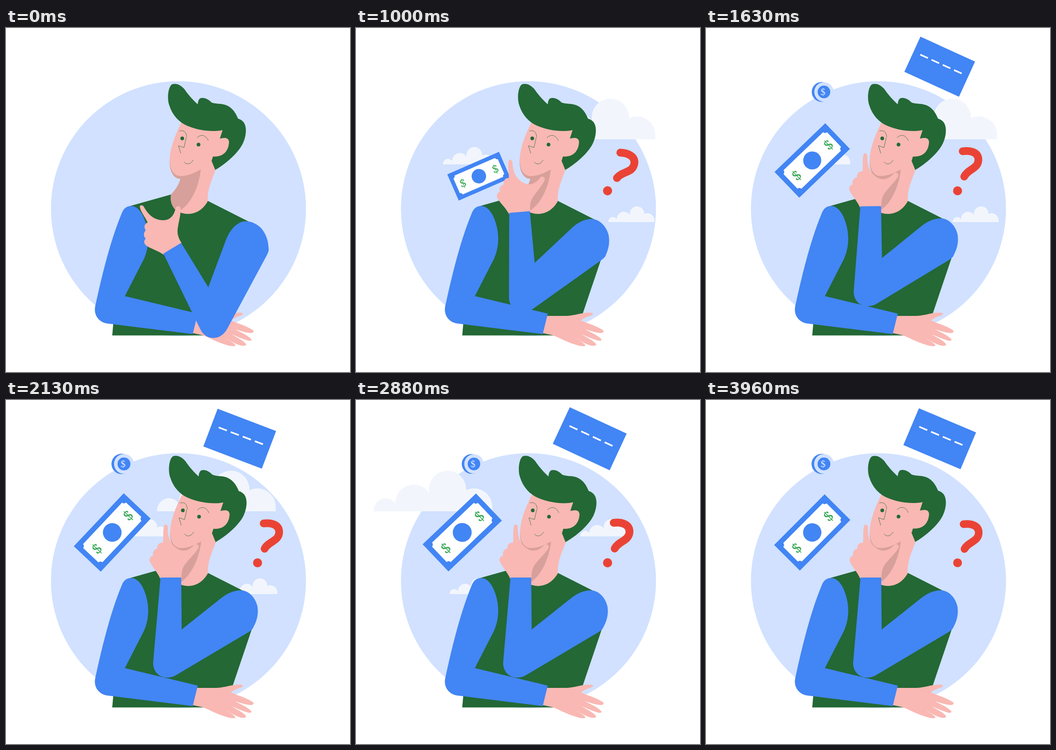
These frames come from a looping animation (748x748 px, 4000 ms). An HTML page:

```html
<!DOCTYPE html>
<html lang="en">
<head>
<meta charset="utf-8">
<title>Thinking about money</title>
<style>
  html, body { margin: 0; width: 100%; height: 100%; overflow: hidden; background: #fff; }
  svg { display: block; width: 100vw; height: 100vh; }
  text { font-family: "Liberation Serif", "Noto Serif", serif; text-anchor: middle; }
  .blue { fill: #4285f4; }
  .pale { fill: #d1e1ff; }
  .green { fill: #236835; }
  .skin { fill: #f9b8b3; }
  .shade { fill: #d8a09a; }
  .cloud { fill: #f2f6fc; }
  .line { fill: none; stroke: #236835; stroke-width: .8; }
  .cash { fill: #34a853; font: 32px "Noto Serif", "Liberation Serif", serif; }
</style>
</head>
<body>
<svg viewBox="0 0 748 748">
  <defs>
    <path id="puff" d="M0 0A26 28 0 0 1 47 -17A40 40 0 0 1 121 -39A40.5 40.5 0 1 1 201 -46A40 40 0 0 1 258 -10V0Z"/>
  </defs>
  <circle class="pale" cx="375" cy="393" r="277.3"/>

  <g class="cloud">
    <use id="cloudBig" href="#puff"/>
    <use id="cloudLeft" href="#puff"/>
    <use id="cloudLow" href="#puff"/>
  </g>

  <g id="card">
    <rect class="blue" x="-68" y="-43.8" width="136" height="87.6"/>
    <path d="M-51.5 -6.7H51.5" stroke="#fff" stroke-width="3.6" stroke-dasharray="19 9"/>
  </g>

  <g id="coin">
    <circle class="blue" cx="-3" r="21.8"/>
    <circle class="pale" cx="2" r="21.3"/>
    <circle class="blue" cx="2" r="13.8"/>
    <text y="7" font-size="21" fill="#e8f0ff">$</text>
  </g>

  <g id="bill">
    <rect class="blue" x="-78" y="-39.6" width="156" height="79.2"/>
    <rect x="-67" y="-28.5" width="134" height="57" fill="#fff"/>
    <g class="blue">
      <circle cx="-67" cy="-28.5" r="6"/><circle cx="67" cy="-28.5" r="6"/>
      <circle cx="-67" cy="28.5" r="6"/><circle cx="67" cy="28.5" r="6"/>
      <circle r="20"/>
    </g>
    <text class="cash" x="-48" y="11.500">$</text>
    <text class="cash" x="50" y="11.500">$</text>
  </g>

  <g id="question">
    <path d="M13 -84C28 -86 45 -82 46 -67C47 -46 23 -46 15 -30" fill="none" stroke="#ea4335" stroke-width="16.5" stroke-linecap="round"/>
    <circle r="9.6" fill="#ea4335"/>
  </g>

  <path class="green" d="M270 387L359 362L400 380L439 376L530 422L538 488L477 668.500H231L233.500 640L262 560Z"/>

  <g id="head">
    <path class="skin" d="M381 322C377 341 368 352 359 362C356 376 362 390 372 398C396 411 424 404 439 376C437 352 447 332 456 307L430 290Z"/>
    <path class="shade" d="M356 284C354 310 364 328 379 328C375 343 367 353 359 362C356 376 361 388 368 395Q374 397 380 396C404 380 420 343 424 305L380 300Z"/>
    <path class="skin" d="M382 204C367 234 356 264 356 286C356 306 364 322 380 322C398 322 412 313 425 307L455 308L448 284L472 284L500 240L480 200Z"/>
    <path class="green" d="M361 122.500C352 128 350 155 355 168C362 190 376 205 395 213C420 223.500 450 226.500 471 222L465 240.500C472 239 484 236 485 248C484 267 473 281 450 279.500L447 289L455 308.500C480 294 506 270 515 251C522 236 525 215 516 204C512 200 508 198 504.500 197C497 178 485 166 465 165C458 164.500 452 164 447 162C439 154 430 150 422 153C418.500 156 417.500 160 417 166C407 157 396 145 388 133C379 123 370 119.500 361 122.500Z"/>
    <g class="green"><circle cx="383.200" cy="240" r="4"/><circle cx="418.600" cy="253.500" r="4"/></g>
    <g class="line">
      <path d="M377 224C386 221 392 226 393 237"/>
      <path d="M415 239C424 230 434 232 440 245"/>
      <path d="M392 238L387 260L375 256L380 272.500"/>
      <path d="M387 291C393 298 401 297 407 287"/>
    </g>
  </g>

  <path class="skin" d="M412 626L458 626C478 625 490 618 511 619C518 620 516 624 508 626C500 629 495 631 489 636C506 643 523 648 537 657C541 661 536 664 529 663C517 662 506 657 498 655C511 662 524 667 533 676C536 681 528 681 521 678C510 675 500 669 490 666C503 673 515 679 522 687C523 692 514 692 506 689C494 685 485 678 478 674C486 680 495 684 499 690C498 694 484 691 476 688C458 683 444 674 428 668L404 663Z"/>
  <path class="blue" d="M270 387C261 388 255 394 252 402C229 457 210 530 194 605C190 624 202 640 220 642.500L406 665.500L417 621L258.500 583L300 502C311 477 312 450 304 424C298 404 287 386 270 387Z"/>

  <path id="hand" class="skin" d="M291 389C290 385 297 384 300 389C306 400 318 418 342 418C358 418 366 406 369 391C371 386 380 386 380 394C380 408 373 430 373 442C373 452 377 460 382 468L343 493C330 484 318 481 308 475C300 471 298 463 304 458C298 453 299 444 304 440C299 434 301 425 308 423C302 410 293 400 291 389Z"/>
  <path id="sleeve" class="blue" d="M336 386L320 570C319 590 333 603.500 350 603.500C358 603.500 364 601.500 371 597.500L526 505.500C533 501 536 499 538 494C546 479 549 466 547 450C543 430 528 415 513 414C495 413 480 421 465 433L382 499L381 386Z"/>
</svg>
<script>
const LOOP = 4000;
const clamp = v => Math.max(0, Math.min(1, v));
const smooth = v => v * v * (3 - 2 * v);
const mix = (a, b, p) => a + (b - a) * p;
const set = (id, transform) => document.getElementById(id).setAttribute('transform', transform);
const place = (id, x, y, angle, scale) =>
  set(id, `translate(${x} ${y}) rotate(${angle}) scale(${scale})`);

// Smooth interpolation through [time, value] pairs
function keys(t, ...list) {
  if (t <= list[0][0]) return list[0][1];
  for (let i = 1; i < list.length; i++) {
    const [t0, v0] = list[i - 1], [t1, v1] = list[i];
    if (t <= t1) return mix(v0, v1, smooth((t - t0) / (t1 - t0)));
  }
  return list[list.length - 1][1];
}

// cubic-bezier(x1, 0, x2, 1)
function ease(x, x1, x2) {
  let lo = 0, hi = 1;
  for (let i = 0; i < 24; i++) {
    const s = (lo + hi) / 2, r = 1 - s;
    if (3 * r * r * s * x1 + 3 * r * s * s * x2 + s * s * s < x) lo = s; else hi = s;
  }
  return smooth(lo);
}

const easeOut = (t, start, length) => 1 - (1 - clamp((t - start) / length)) ** 2;

// Glide in, almost rest at 1500 ms, then speed away
function drift(t, rest, before, after) {
  return t < 1500
    ? rest + before * ((1500 - t) / 920) ** 3.2
    : rest + after * ((t - 1500) / 1380) ** 2.5;
}

function draw(t) {
  const arm = 31 * ease(clamp(t / 2000), 0.24, 0.1);
  set('hand', `rotate(${arm} 527.5 427)`);
  set('sleeve', `rotate(${arm - 31} 527.5 427)`);

  const nod = smooth(clamp(1 - Math.abs((t % 2000) - 500) / 500));
  set('head', `rotate(${2.7 * nod} 385 405)`);

  place('cloudBig', drift(t, 376, 118, -337), 242, 0, 1);
  place('cloudLeft', drift(t, 203, -100, 284), 296.5, 0, 0.426);
  place('cloudLow', drift(t, 537, 83, -333), 422, 0, 0.388);

  const sway = Math.cos((t - 1500) / 1400 * 2 * Math.PI);

  const bill = easeOut(t, 700, 560);
  const billSize = keys(t, [1260, 1], [1630, 0.98], [2130, 1.015], [2880, 1.028], [3960, 0.997]);
  const billSway = 1.6 * sway * clamp((t - 1000) / 400);
  place('bill', mix(400, 231, bill), mix(448, 288, bill), mix(56, -45.2, bill) + billSway, bill * billSize);

  const card = easeOut(t, 1060, 480);
  const cardSize = keys(t, [1540, 0.955], [1630, 0.96], [2130, 1], [2880, 1.003], [3960, 0.992]);
  place('card', mix(430, 508.2, card), mix(250, 84.2, card), mix(-40, 22.8, card) + 2.1 * sway, card * cardSize);

  const coin = keys(t, [1080, 0], [1400, 1.03], [1630, 0.99], [2130, 1.015], [2880, 0.99], [3960, 1.01]);
  place('coin', 254.5, 139, 0, coin);

  const tilt = keys(t, [700, 55], [1000, 9.7], [1300, -2.5], [1630, -1.4], [2130, 0], [3960, 0]);
  const markSize = keys(t, [700, 0], [950, 1.03], [1630, 1.02], [2130, 1.02], [2880, 1.035], [3960, 1]);
  place('question', 547, 354, tilt, markSize);
}

function tick() {
  draw(performance.now() % LOOP);
  requestAnimationFrame(tick);
}
draw(0);
tick();
</script>
</body>
</html>
```
